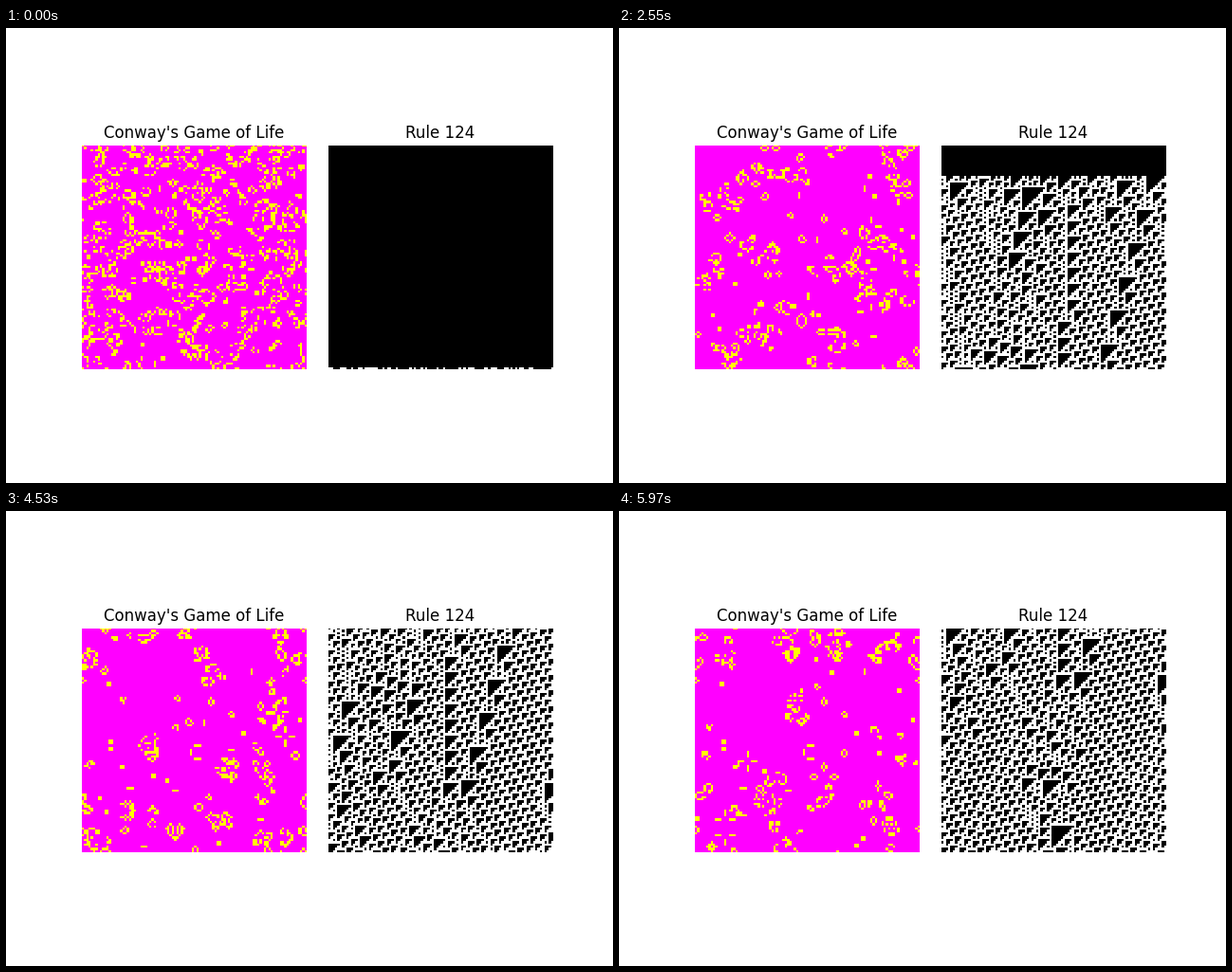
Write a matplotlib script that moves like this. It is 640x480 px and loops after 6 s.

```python
import numpy as np
import matplotlib.pyplot as plt
from matplotlib.animation import FuncAnimation

N = 100
FRAMES = 200
RULE = 124
WARMUP = 2

rng = np.random.default_rng(12)


def life_step(grid):
    """One generation of Life on a torus."""
    near = sum(np.roll(grid, (dy, dx), (0, 1))
               for dy in (-1, 0, 1) for dx in (-1, 0, 1) if dy or dx)
    return ((near == 3) | ((grid == 1) & (near == 2))).astype(int)


def rule_step(row):
    """One step of the elementary automaton on a ring, read right to left."""
    code = 4 * np.roll(row, -1) + 2 * row + np.roll(row, 1)
    return (RULE >> code) & 1


def run(state, step, count):
    states = [state]
    for _ in range(count - 1):
        states.append(step(states[-1]))
    return states


seed_grid = (rng.random((N, N)) < 0.2).astype(int)
life = run(seed_grid, life_step, FRAMES + WARMUP)[WARMUP:]

# Blank rows above the history let it scroll in from the bottom.
rows = run(rng.integers(0, 2, N), rule_step, FRAMES)
strip = np.vstack([np.zeros((N - 1, N), int), rows])


def rule_view(i):
    return strip[i:i + N]


fig, axes = plt.subplots(1, 2, figsize=(6.4, 4.8), dpi=100)
fig.subplots_adjust(left=0.125, right=0.9, bottom=0.11, top=0.88, wspace=0.1)


def panel(ax, title, data, cmap):
    ax.set_title(title, fontsize=12, fontfamily="DejaVu Sans")
    ax.axis("off")
    return ax.imshow(data, cmap=cmap, vmin=0, vmax=1, interpolation="nearest")


life_img = panel(axes[0], "Conway's Game of Life", life[0], "spring")
rule_img = panel(axes[1], "Rule 124", rule_view(0), "gray")


def update(i):
    life_img.set_data(life[i])
    rule_img.set_data(rule_view(i))
    return life_img, rule_img


anim = FuncAnimation(fig, update, frames=FRAMES, interval=30,
                     repeat=True, repeat_delay=0, blit=False)
plt.show()
```
